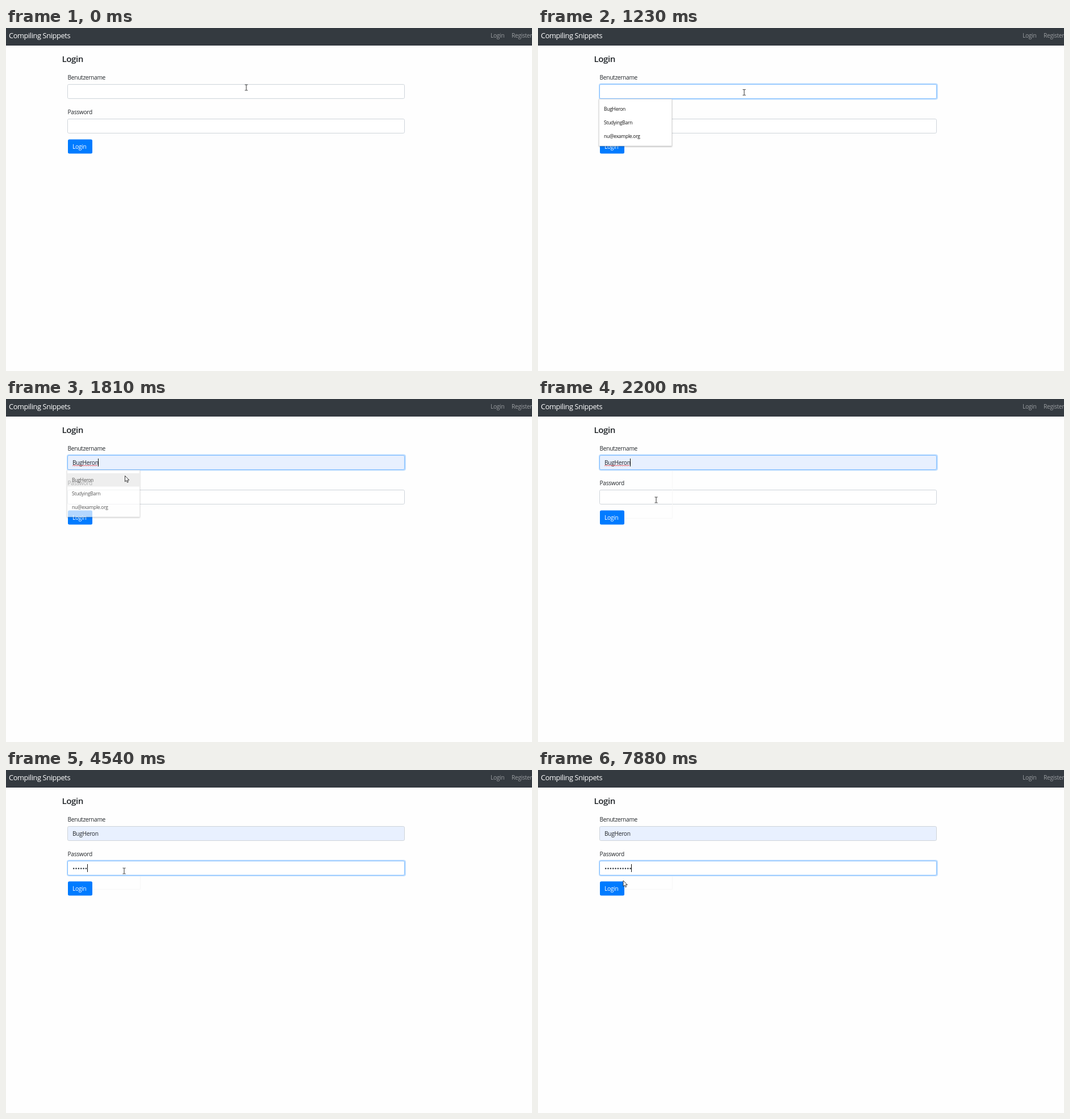
An HTML page that plays this animation: 926x605 px, repeating every 8 s.

```html
<!DOCTYPE html>
<html lang="de">
<head>
<meta charset="utf-8">
<title>Login</title>
<style>
html, body { margin: 0; width: 100%; height: 100%; overflow: hidden; background: #fefefe; }
svg { display: block; width: 926px; height: 605px; }
text { font: 10.2px "Open Sans", "Noto Sans", sans-serif; letter-spacing: -.03em; fill: #212529; }
.brand { font-size: 12.8px; fill: #fff; }
.nav { fill: #9a9da0; }
.title { font-size: 15.2px; font-weight: 600; }
.small { font-size: 8.5px; fill: #111; }
.field { stroke: #ced4da; fill: #fff; }
.ring { fill: #bfdeff; }
#menu { filter: drop-shadow(0 1px 1px rgba(0, 0, 0, .3)); }
</style>
</head>
<body>
<svg viewBox="0 0 926 605">
  <rect width="926" height="31" fill="#343a40"/>
  <text class="brand" x="5" y="18">Compiling Snippets</text>
  <text class="nav" x="853" y="17">Login</text>
  <text class="nav" x="890" y="17">Register</text>
  <text class="title" x="98.5" y="60">Login</text>
  <text x="108.5" y="91">Benutzername</text>
  <text x="108.5" y="152">Password</text>

  <rect id="userRing" class="ring" x="107" y="97.5" width="597" height="29" rx="4"/>
  <rect id="userBox" class="field" x="108.5" y="99.5" width="593" height="25" rx="2.2"/>
  <rect id="passRing" class="ring" x="107" y="158.5" width="597" height="29" rx="4"/>
  <rect id="passBox" class="field" x="108.5" y="160.5" width="593" height="25" rx="2.2"/>
  <text id="preview" class="small" x="117" y="116">BugHeron</text>
  <text id="user" x="117" y="116">BugHeron</text>
  <path id="squiggle" fill="none" stroke="#e5484d" stroke-width=".9"/>
  <path id="dots" fill="none" stroke="#333a40" stroke-width="2.6" stroke-linecap="round" stroke-dasharray="0 4.35"/>

  <rect x="109" y="196.5" width="43" height="25" rx="2.5" fill="#007bff"/>
  <text x="117" y="213" style="fill:#fff">Login</text>
  <path id="ghostTop" d="M236.5 127V188" stroke="#f6f6f6"/>
  <path id="ghost" d="M236.5 188V210.5H153" fill="none" stroke="#f6f6f6"/>

  <g id="menu">
    <rect x="107.5" y="125.5" width="128" height="82.5" fill="#fff" stroke="#dedede" stroke-width=".8"/>
    <rect id="hover" x="108" y="131" width="127.5" height="23.5" fill="#e8e8e8"/>
    <text class="small" x="116" y="146">BugHeron</text>
    <text class="small" x="116" y="170">StudyingBarn</text>
    <text class="small" x="116" y="194">nu@example.org</text>
  </g>

  <rect id="caret" width="1" height="14" fill="#111"/>
  <path id="beam" d="M-2.5 -5H-.8L0 -4.5L.8 -5H2.5M0 -4.5V4.5M-2.5 5H-.8L0 4.5L.8 5H2.5" fill="none" stroke="#333" stroke-width="1"/>
  <path id="arrow" d="M.5 .5V10.8L2.9 8.6L4.5 12.2L6.2 11.4L4.7 8H7.8Z" fill="#fff" stroke="#222" stroke-width=".9"/>
</svg>
<script>
const $ = id => document.getElementById(id);
const LOOP = 8000, LEFT = 117, PITCH = 4.35;

// Each track lists [start time, values...]; values hold until the next entry.
const pointer = [[0, 423, 105, 'beam'], [120, 421.5, 110, 'beam'], [1230, 363, 113.5, 'beam'],
  [1390, 215, 135, 'arrow'], [1530, 209, 135, 'arrow'], [1930, 208, 160, 'arrow'],
  [2050, 208, 174.5, 'beam'], [2200, 208, 178, 'beam'], [7600, 207, 178.5, 'beam'],
  [7750, 165, 190, 'arrow'], [7880, 149.5, 194.5, 'arrow']];
const caretOn = [[0, 0], [270, 1], [830, 0], [1390, 1], [2940, 0], [3250, 1],
  [6090, 0], [6220, 1], [6650, 0], [6770, 1], [7350, 0], [7880, 1]];
const typed = [[0, 0], [3250, 1], [3410, 2], [3810, 3], [3960, 5], [4540, 6],
  [5100, 7], [5530, 9], [6220, 10], [6770, 11]];
const userFocus = [[0, 0], [270, .5], [400, 1], [2350, .5], [2480, 0]];
const passFocus = [[0, 0], [2350, .5], [2480, 1]];
const menuAlpha = [[0, 0], [400, 1], [1810, .7], [1930, .3], [2050, 0]];

const at = (track, t) => track.findLast(k => k[0] <= t).slice(1);
const show = (id, alpha) => $(id).setAttribute('opacity', +alpha);
const userWidth = $('user').getComputedTextLength();

let wave = `M${LEFT} 118`;
for (let x = 2, up = 1; x <= userWidth; x += 2, up = !up) wave += `L${LEFT + x} ${up ? 116.8 : 118}`;
$('squiggle').setAttribute('d', wave);

function focus(name, amount) {
  show(name + 'Ring', amount);
  $(name + 'Box').style.stroke = `color-mix(in srgb, #80bdff ${amount * 100}%, #ced4da)`;
}

function draw(now) {
  const t = now % LOOP;
  const chosen = t >= 1810, inPassword = t >= 2350;

  focus('user', at(userFocus, t)[0]);
  focus('pass', at(passFocus, t)[0]);
  $('userBox').style.fill = t >= 1390 ? '#e8f0fe' : '#fff';
  show('preview', t >= 1390 && !chosen);
  show('user', chosen);
  show('squiggle', chosen && !inPassword);
  show('menu', at(menuAlpha, t)[0]);
  show('hover', t >= 1390);
  show('ghost', t >= 2050);
  show('ghostTop', t >= 2050 && !inPassword);

  const [count] = at(typed, t);
  show('dots', count > 0);
  $('dots').setAttribute('d', `M${LEFT + PITCH / 2} 173.7h${Math.max(0, count - 1) * PITCH + .1}`);

  const offset = inPassword ? count * PITCH : chosen ? userWidth : 0;
  $('caret').setAttribute('x', Math.floor(LEFT + offset));
  $('caret').setAttribute('y', inPassword ? 166 : 105);
  show('caret', at(caretOn, t)[0]);

  const [x, y, shape] = at(pointer, t);
  for (const id of ['beam', 'arrow']) {
    show(id, id === shape);
    $(id).setAttribute('transform', `translate(${x} ${y})`);
  }
}

const start = performance.now();
(function tick() {
  draw(performance.now() - start);
  requestAnimationFrame(tick);
})();
</script>
</body>
</html>
```
